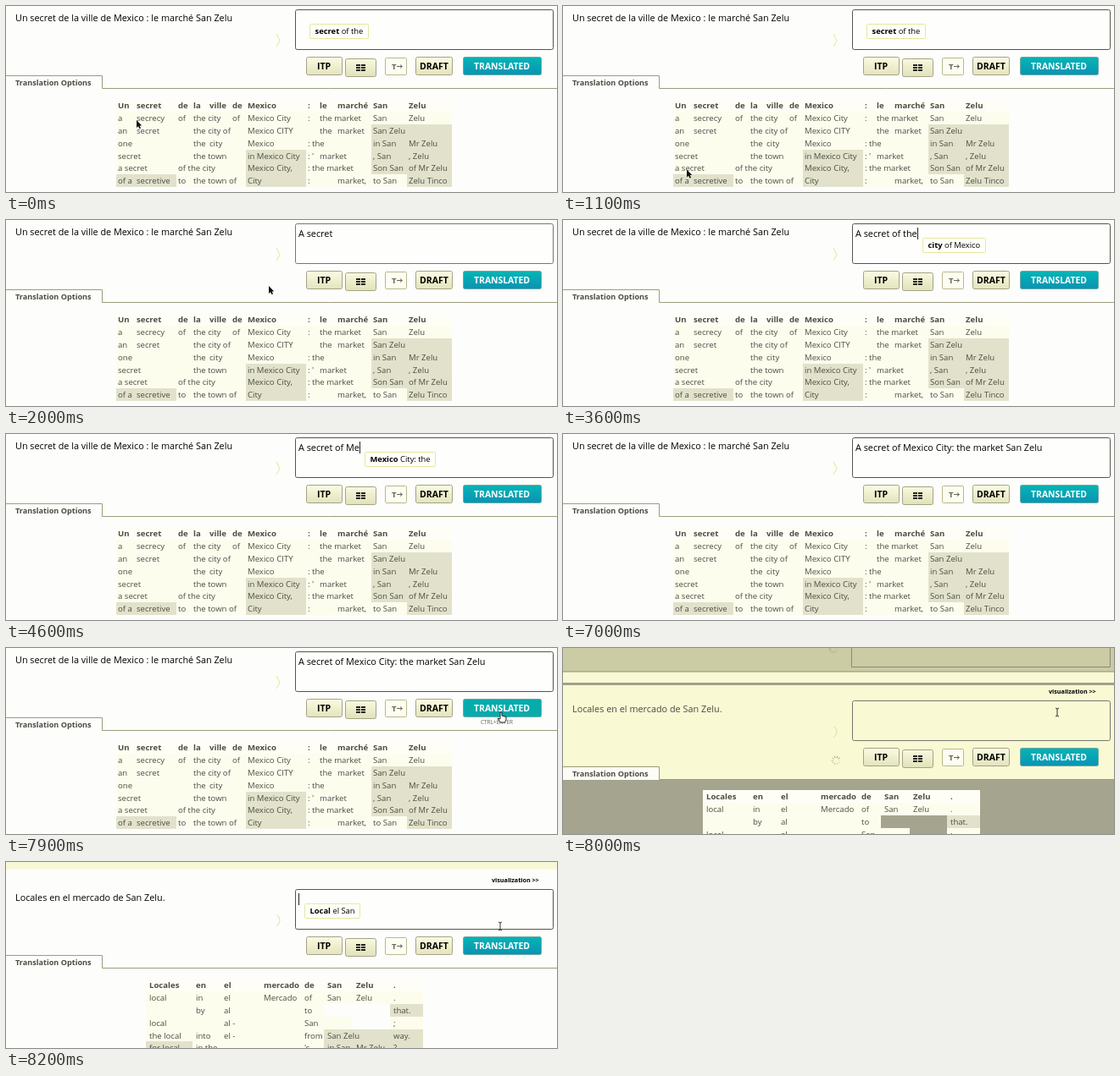
An HTML page with a canvas that plays this animation: 650x220 px, repeating every 8.3 s.

```html
<!DOCTYPE html>
<html lang="en">
<head>
<meta charset="utf-8">
<title>Interactive translation</title>
<style>
html, body { margin: 0; width: 100%; height: 100%; overflow: hidden; background: #fdfdfb; }
canvas { display: block; }
</style>
</head>
<body>
<canvas id="stage" width="650" height="220"></canvas>
<script>
const ctx = document.getElementById('stage').getContext('2d');
const LOOP = 8300, STEP = 100, SCROLL_START = 8000, SCROLL_END = 8200;
const TEXT_X = 345, TEXT_SIZE = 10.85, ROW_HEIGHT = 14.8;
const PAGE = '#fdfdfb', VEIL = '#f9f9d4', BORDER = '#a3a388', SOFT_TEXT = '#4c4c42';

// Cells: "<" extends the cell to its left, "_" is a hole, a trailing "#" shades the cell.
const frenchTable = {
  pad: 2,
  columns: [130, 152, 201, 219, 238, 265, 283, 354, 368, 389, 431, 473, 526],
  rows: [
    'Un|secret|de|la|ville|de|Mexico|:|le|marché|San|Zelu',
    'a|secrecy|of|the city|<|of|Mexico City|:|the market|<|San|Zelu',
    'an|secret||the city of|<|<|Mexico CITY||the|market|San Zelu#|<',
    'one|||the|city||Mexico|: the|<||in San#|Mr Zelu#',
    'secret|<||the town|<||in Mexico City#|: \'|market|<|, San#|, Zelu#',
    'a secret|<|of the city|<|<||Mexico City,#|: the market|<|<|Son San#|of Mr Zelu#',
    'of a#|secretive#|to|the town of|<|<|City#|:||market,|to San|Zelu Tinco#'
  ]
};
const spanishTable = {
  pad: 4,
  columns: [165, 220, 253, 300, 348, 375, 409, 453, 492],
  rows: [
    'Locales|en|el|mercado|de|San|Zelu|.',
    'local|in|el|Mercado|of|San|Zelu|.',
    '|by|al||to|_|_|that.#',
    'local||al -||San|<|_|;',
    'the local|into|el -||from|San Zelu#|<|way.#',
    'for local#|in the|-||\'s|in San#|Mr Zelu#|?#'
  ]
};

const draft = 'A secret of the city of Mexico'.split(' ');
const draftTimes = [1600, 1600, 2800, 3100];
const final = 'A secret of Mexico City: the market San Zelu'.split(' ');
const finalTimes = [0, 0, 0, 4900, 5200, 5400, 5600, 6300, 6700];
const REVISE = 4100;

// [time, x, y]
const pointerIn = [[0, 154, 135], [800, 150, 197], [1400, 142, 190], [1800, 142, 190],
  [2000, 310, 78], [2300, 430, 23], [2600, 430, 23]];
const pointerOut = [[7500, 606, 30], [7700, 583, 76], [LOOP, 583, 76]];

function along(path, t) {
  const i = path.findIndex(point => point[0] > t);
  const [t0, x0, y0] = path[i - 1], [t1, x1, y1] = path[i];
  const k = (t - t0) / (t1 - t0);
  return [x0 + (x1 - x0) * k, y0 + (y1 - y0) * k];
}

// Typed text and suggested words at time t.
function editorState(t) {
  const revised = t >= REVISE;
  const words = revised ? final : draft;
  const accepted = (revised ? finalTimes : draftTimes).filter(time => t >= time).length;
  const focused = t < 1600 || t >= 2400;
  const deleted = revised ? 0 : Math.max(0, (t - 3500) / STEP);
  let text = words.slice(0, accepted).map(word => word + ' ').join('');
  if (accepted === words.length) text = text.trimEnd();
  if (deleted) text = text.slice(0, -deleted);
  if (t >= 4500 && t < 4900) text += final[3].slice(0, (t - 4400) / STEP);
  const start = Math.max(1, accepted);
  return {
    text, focused,
    suggestion: focused && deleted < 2 ? words.slice(start, start + 3) : [],
    caret: focused && t < 7500 && t % 1000 >= 200,
    indent: 13
  };
}

function rect(x, y, w, h, fill) {
  ctx.fillStyle = fill;
  ctx.fillRect(x, y, w, h);
}

function textWidth(text, size, bold) {
  ctx.font = `${bold ? 700 : 400} ${size}px "Open Sans", "Noto Sans", sans-serif`;
  return ctx.measureText(text).width;
}

function label(text, x, y, size, color = '#000', bold = false) {
  const width = textWidth(text, size, bold);
  ctx.fillStyle = color;
  ctx.fillText(text, x, y);
  return width;
}

function stroke(points, color, width = 1) {
  ctx.strokeStyle = color;
  ctx.lineWidth = width;
  ctx.beginPath();
  points.forEach(([x, y]) => ctx.lineTo(x, y));
  ctx.stroke();
}

function polygon(x, y, points, fill, outline) {
  ctx.beginPath();
  points.forEach(([dx, dy]) => ctx.lineTo(x + dx, y + dy));
  ctx.closePath();
  ctx.fillStyle = fill;
  ctx.fill();
  ctx.strokeStyle = outline;
  ctx.lineWidth = 1;
  if (outline) ctx.stroke();
}

function box(x, y, w, h, fill, border, radius = 2) {
  ctx.beginPath();
  ctx.roundRect(x + .5, y + .5, w - 1, h - 1, radius);
  ctx.fillStyle = fill;
  ctx.fill();
  ctx.strokeStyle = border;
  ctx.lineWidth = 1;
  ctx.stroke();
}

function buttonFill(from, to) {
  const gradient = ctx.createLinearGradient(0, 61, 0, 82);
  gradient.addColorStop(0, from);
  gradient.addColorStop(1, to);
  return gradient;
}

function drawTable({ pad, columns, rows }) {
  rows.forEach((line, row) => {
    const cells = line.split('|');
    const y = Math.round(110.4 + row * ROW_HEIGHT);
    const height = Math.round(110.4 + (row + 1) * ROW_HEIGHT) - y;
    cells.forEach((cell, i) => {
      if (cell === '_' || cell === '<') return;
      let end = i + 1;
      while (cells[end] === '<') end++;
      const shaded = cell.endsWith('#');
      const x = columns[i];
      rect(x, y, columns[end] - x, height, shaded ? '#e2e2cc' : row ? '#fdfdee' : '#fefef6');
      label(cell.replace('#', ''), x + pad, y + 10.8, 9.6, SOFT_TEXT, row === 0);
    });
  });
}

function drawButtons(hover) {
  const face = buttonFill('#fafae2', '#e3e3bc');
  const button = (text, x, y, w, textX) => {
    box(x, y, w, 22, face, BORDER);
    label(text, textX, 75, 10.5, '#000', true);
  };
  button('ITP', 354, 60, 43, 367);
  button('', 400, 62, 37, 0);
  for (const x of [413, 419]) for (let y = 69; y < 78; y += 3) rect(x, y, 5, 2, '#222');
  box(447, 61, 26, 21, '#fdfdf2', '#b9b990', 1);
  label('T', 455, 75, 9.5, '#66665a', true);
  stroke([[461, 71.5], [467, 71.5]], '#66665a');
  stroke([[465, 69.5], [467.5, 71.5], [465, 73.5]], '#66665a');
  button('DRAFT', 483, 60, 44, 488);
  box(539, 60, 93, 22, hover ? '#06abac' : buttonFill('#06b4b4', '#0893b4'), '#6fa9a4');
  label('TRANSLATED', 552, 75, 10.4, '#fff', true);
  if (hover) label('CTRL+ENTER', 560, 90, 6.4, '#66665a');
}

function drawSuggestion(x, words) {
  const next = words[0];
  const rest = words.slice(1).map(word => ' ' + word).join('');
  const width = textWidth(next, 9.4, true) + textWidth(rest, 9.4);
  box(x, 21, Math.round(width + 13), 18, '#fffffa', '#e6e6a0', 1);
  const end = label(next, x + 6.5, 33, 9.4, '#000', true);
  label(rest, x + 6.5 + end, 33, 9.4);
}

function drawEditor({ text, suggestion, caret, focused, indent }, fill = '#fefefc') {
  box(341, 4, 305, 48, fill, focused ? '#55554e' : '#77776c');
  const width = label(text, TEXT_X, 19.5, TEXT_SIZE);
  if (caret) rect(Math.round(TEXT_X + width), 9, 1, 14, '#222');
  if (suggestion.length) drawSuggestion(Math.round(TEXT_X + (text ? width + 6 : indent)), suggestion);
}

function drawTab() {
  stroke([[0, 82.5], [113.5, 82.5], [113.5, 97.5], [650, 97.5]], '#9c9c7d');
  label('Translation Options', 11, 94, 9.1, SOFT_TEXT, true);
}

function drawArrow(x, y) {
  polygon(x, y, [[0, 0], [0, 9], [2, 7.2], [3.6, 10.3], [5, 9.6], [3.7, 6.6], [6.3, 6.4]], '#111');
}

function drawHand(x, y) {
  polygon(x, y, [[0, 0], [2, 0], [2, 4], [7, 5.5], [7, 9], [5.5, 12], [0, 12], [-3, 7], [0, 8]], '#fff', '#222');
}

function drawBeam(x, y) {
  stroke([[x, y - 4], [x, y + 4]], '#333');
  for (const s of [-1, 1]) stroke([[x - 2, y + 5 * s], [x, y + 4 * s], [x + 2, y + 5 * s]], '#333');
}

function drawSpinner(x, y) {
  for (let i = 0; i < 10; i++) {
    const a = i * Math.PI / 5;
    const spoke = r => [x + r * Math.cos(a), y + r * Math.sin(a)];
    stroke([spoke(3), spoke(5.5)], `rgba(110,110,80,${.15 + i * .06})`);
  }
}

function drawPointer(t, hover) {
  const path = t < 2600 ? pointerIn : pointerOut;
  if (t >= 2600 && t < 7500) return;
  const [x, y] = along(path, t);
  const draw = hover ? drawHand : x > 341 && y < 53 ? drawBeam : drawArrow;
  draw(x, y);
}

function drawFrench(t) {
  const hover = t >= 7700;
  label('Un secret de la ville de Mexico : le marché San Zelu', 11, 18, TEXT_SIZE);
  stroke([[319, 33], [323, 41], [319, 48]], '#e9e58c');
  drawEditor(editorState(t));
  drawButtons(hover);
  drawTab();
  drawTable(frenchTable);
  drawPointer(t, hover);
}

function drawSpanish(t) {
  const ready = t >= SCROLL_END;
  const veil = (SCROLL_END - t) / (SCROLL_END - SCROLL_START);
  ctx.save();
  ctx.translate(0, 28 + 30 * veil);
  rect(0, -28, 650, 9, '#f8f8d8');
  if (!ready) {
    rect(0, -60, 650, 30, '#cbcba4');
    stroke([[340.5, -60], [340.5, -35.5], [645.5, -35.5], [645.5, -60]], '#8a8a70');
    drawSpinner(319, -57);
    rect(0, -30, 650, 128, VEIL);
    rect(0, 98, 650, 130, '#a4a48f');
    rect(0, -30.5, 650, 1, '#8f8f78');
    rect(0, -17, 650, 3, '#a0a08c');
    rect(0, 83, 113, 15, '#fdfdf6');
    drawSpinner(322, 75);
  }
  label('visualization >>', 573, -4.5, 7.2, '#000', true);
  label('Locales en el mercado de San Zelu.', 11, 18, TEXT_SIZE, ready ? '#000' : SOFT_TEXT);
  ctx.strokeStyle = '#e2de98';
  ctx.beginPath();
  ctx.arc(316, 41, 7, -1.1, 1.1);
  ctx.stroke();
  drawEditor({
    text: '', focused: ready, caret: ready, indent: 7,
    suggestion: ready ? ['Local', 'el', 'San'] : []
  }, ready ? undefined : VEIL);
  drawButtons(false);
  drawTab();
  drawTable(spanishTable);
  ctx.restore();
  drawBeam(583, 76);
}

function frame(now) {
  const t = Math.floor(now % LOOP / STEP) * STEP;
  rect(0, 0, 650, 220, PAGE);
  (t < SCROLL_START ? drawFrench : drawSpanish)(t);
  requestAnimationFrame(frame);
}
requestAnimationFrame(frame);
</script>
</body>
</html>
```
